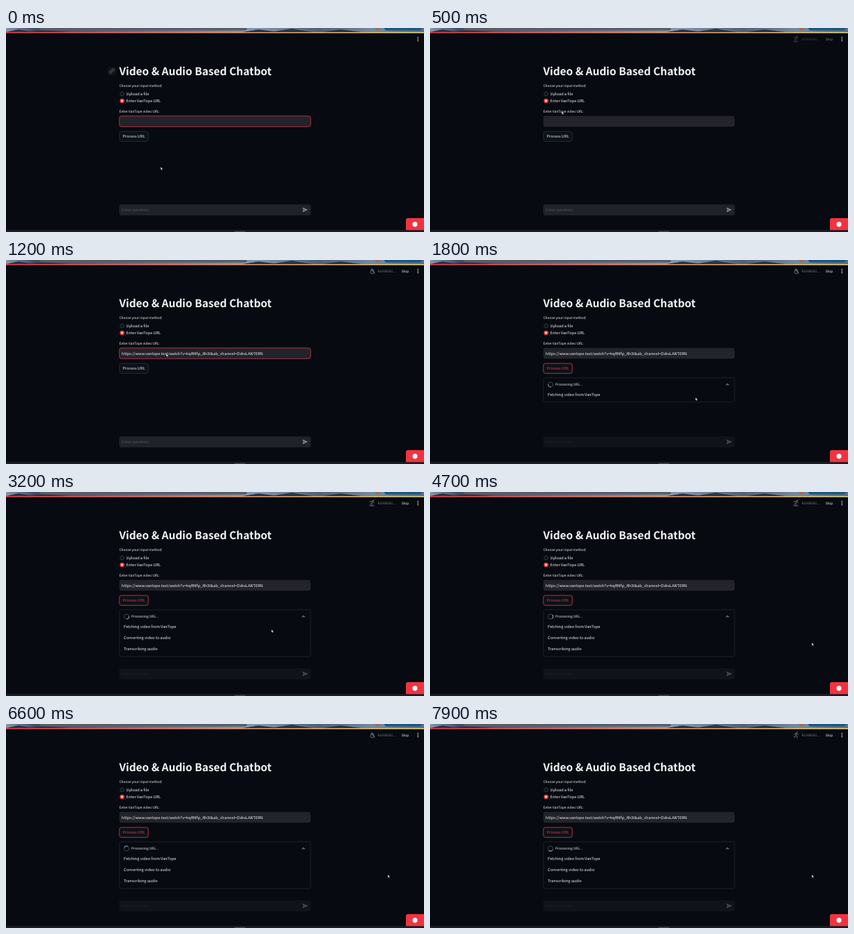
Recreate the animation shown at these times as an HTML page. Size 600 by 294 pixels, loop 8000 ms.

```html
<!DOCTYPE html>
<html lang="en">
<head>
<meta charset="utf-8">
<title>Chatbot</title>
<style>
  html, body { margin: 0; width: 100%; height: 100%; overflow: hidden; background: #070a10; }
  svg { display: block; width: 100vw; height: 100vh; }
  text {
    font: 5.6px "Noto Sans CJK JP", "Noto Sans CJK SC", "Noto Sans CJK KR", "Noto Sans CJK TC", "Open Sans", sans-serif;
    fill: #f4f5f7; text-rendering: geometricPrecision; white-space: pre;
  }
  .small { font-size: 4.9px; }
  .title { font-size: 15.4px; font-weight: 700; }
  .line { fill: none; stroke-linecap: round; stroke-linejoin: round; }
</style>
</head>
<body>
<svg viewBox="0 0 600 294">
  <defs>
    <linearGradient id="deco"><stop stop-color="#f5404a"/><stop offset="1" stop-color="#f3e07a"/></linearGradient>
    <linearGradient id="sky">
      <stop stop-color="#8595a8"/><stop offset=".07" stop-color="#3d4c62"/>
      <stop offset=".3" stop-color="#5d6f88"/><stop offset=".6" stop-color="#8199b6"/>
      <stop offset=".75" stop-color="#4e607b"/><stop offset=".88" stop-color="#7489a5"/>
      <stop offset="1" stop-color="#5a6f8c"/>
    </linearGradient>
  </defs>

  <!-- browser edge -->
  <rect width="600" height="6" fill="url(#sky)"/>
  <path d="M0 6 18 2 34 5 52 3 90 6zM340 6 362 2 385 5 410 1 440 6zM455 6 480 2 510 6z" fill="#28364a"/>
  <rect x="48" y="-6" width="298" height="9.5" rx="4" fill="#595d67"/>
  <circle cx="533" cy="0" r="3.5" fill="#a06a52"/>
  <rect x="543" y="-6" width="54" height="9.5" rx="4" fill="#1d5683"/>
  <rect y="6" width="600" height="1.4" fill="url(#deco)"/>
  <g fill="#e8e9eb"><circle cx="591.3" cy="13.6" r=".8"/><circle cx="591.3" cy="16" r=".8"/><circle cx="591.3" cy="18.4" r=".8"/></g>

  <g id="status">
    <g class="line" stroke="#777a82" stroke-width=".9">
      <g class="pose"><circle cx="525.6" cy="17.2" r="2.6"/><path d="M525 12.4v3.2h2.6l1.6 3.6M525 13.6l2.4.4"/></g>
      <g class="pose"><circle cx="526.6" cy="12.2" r=".5"/><path d="M526 13.6l-1 2.6 2 1.4-.4 2.4M525 16.4l-.8 2.2-2 .2M523 15l1-1.4 2 .1 1.4 1.4 1.4-.2"/></g>
      <g class="pose"><circle cx="527" cy="12.2" r=".6"/><path d="M526.6 13.8l-2.4 2 2 1.4-1.4 2.2M522.4 14l2-.4 2.2.2 2 1.6M524.2 16.8l-1.6 1.4M522 19.8h6.4"/></g>
    </g>
    <text class="small" x="533.5" y="17.7" style="fill:#73767e">RUNNING...</text>
    <text class="small" x="567.7" y="17.7">Stop</text>
  </g>

  <g id="link" class="line" stroke="#6c7078" stroke-width=".9">
    <rect x="145.5" y="56" width="13" height="12.5" rx="3" fill="#10141b" stroke="none"/>
    <g transform="rotate(-45 152 62)"><path d="M151.2 60.4h-1.4a1.6 1.6 0 0 0 0 3.2h1.4M152.8 60.4h1.4a1.6 1.6 0 0 1 0 3.2h-1.4M150.6 62h2.8"/></g>
  </g>
  <text class="title" x="162.5" y="67.8">Video &amp; Audio Based Chatbot</text>

  <text class="small" x="162.5" y="85.1">Choose your input method:</text>
  <circle cx="166.6" cy="95" r="2.9" fill="#10131b" stroke="#3b3f49" stroke-width=".8"/>
  <circle cx="166.6" cy="104.9" r="3.2" fill="#f5404a"/><circle cx="166.6" cy="104.9" r="1.2" fill="#fff"/>
  <text x="172.6" y="97.2">Upload a file</text>
  <text x="172.6" y="107.1">Enter VanTope URL</text>

  <text class="small" x="162.5" y="122.2">Enter VanTope video URL:</text>
  <rect id="field" x="162.7" y="126.8" width="274.6" height="15.4" rx="3" fill="#22232b" stroke-width=".8"/>
  <text id="url" x="166" y="136.8">https://www.vantope.test/watch?v=kqRMfp_8h3t&amp;ab_channel=OdreLANTERN</text>

  <rect id="button" x="162.8" y="149" width="41.4" height="14.4" rx="3" fill="#0d1118" stroke-width=".8"/>
  <text id="label" x="183.5" y="158.3" text-anchor="middle">Process URL</text>

  <g id="panel">
    <rect id="frame" x="162.8" y="169.8" width="274.4" rx="3" fill="none" stroke="#23272f" stroke-width=".8"/>
    <circle cx="173" cy="179.5" r="3.6" class="line" stroke="#3f4552"/>
    <path id="spin" d="M173 175.9a3.6 3.6 0 0 1 3.6 3.6" class="line" stroke="#7f9fd0"/>
    <text class="small" x="180" y="181.3">Processing URL...</text>
    <path d="M425.5 180l1.5-1.5 1.5 1.5" class="line" stroke="#f4f5f7" stroke-width=".9"/>
    <text class="step" x="169" y="195.6">Fetching video from VanTope</text>
    <text class="step" x="169" y="211.8">Converting video to audio</text>
    <text class="step" x="169" y="228">Transcribing audio</text>
  </g>

  <rect id="chat" x="162.5" y="254.3" width="275" height="15.6" rx="3"/>
  <text id="ask" x="166" y="264.2">Enter question:</text>
  <path id="send" d="M426 258.8l7.6 3.2-7.6 3.2v-2.5l5-.7-5-.7z"/>

  <!-- corner badge and window edge -->
  <rect y="291" width="600" height="3" fill="#1b1d21"/>
  <rect x="328" y="292.8" width="15" height="1.2" fill="#4a4c50"/>
  <path d="M574 291.3V277a3 3 0 0 1 3-3h23v17.3z" fill="#f0333f"/>
  <circle cx="587" cy="282.8" r="3.6" fill="#fff"/>
  <g id="wait">
    <path d="M0 282.6h197.5a2 2 0 0 1 2 2v6.6H0z" fill="#5b7ca8"/>
    <text class="small" x="1.8" y="288.9" style="fill:#17202e">Waiting for www.nolvra.test...</text>
  </g>

  <g id="cursor" stroke="#000" stroke-width=".45" stroke-linejoin="round">
    <path id="arrow" d="M0 0v4.6l1.1-1 .8 1.7.8-.4-.8-1.6h1.5z" fill="#fff"/>
    <path id="hand" d="M-.5-2.4q.6-.6 1.1 0v2l2 .5q.6.2.5 1l-.4 2.4h-3.1l-2-2.6q.3-.8 1.1-.2l.8.6z" fill="#fff"/>
  </g>
</svg>
<script>
const $ = id => document.getElementById(id);
const all = name => [...document.getElementsByClassName(name)];
const poses = all("pose"), steps = all("step");
const LOOP = 8000, TICK = 100;
const CLICK = 1400;                      // button pressed
const STEP_AT = [1600, 2100, 2500];      // progress lines appear

// time, x, y
const path = [
  [0, 222, 200], [200, 222, 200], [600, 183, 105], [800, 183, 105],
  [1000, 230, 135], [1200, 230, 135], [1400, 185, 156],
  [1700, 381, 198], [3800, 381, 198], [4300, 548, 217]
];

const clamp = v => Math.max(0, Math.min(1, v));
const show = (el, v) => el.setAttribute("opacity", +v);

function paint(el, fill, stroke) {
  if (fill) el.style.fill = fill;
  if (stroke) el.style.stroke = stroke;
}

function pointer(t) {
  const i = path.findIndex(p => p[0] > t);
  if (i < 0) return path[path.length - 1].slice(1);
  const [t0, x0, y0] = path[i - 1], [t1, x1, y1] = path[i];
  const u = (t - t0) / (t1 - t0), e = u * u * (3 - 2 * u);
  return [x0 + (x1 - x0) * e, y0 + (y1 - y0) * e];
}

function draw(t) {
  const busy = t >= CLICK;

  show($("status"), t < 500 ? 0 : t < 1000 ? .5 : 1);
  poses.forEach((p, i) => show(p, t / TICK % 3 === i));
  show($("link"), t < 300);
  show($("wait"), t >= 600 && t < 1100);
  paint($("field"), "", t < 400 || (t >= 1000 && t < CLICK) ? "#d93842" : "none");
  show($("url"), t >= 1100);
  paint($("button"), "", busy ? "#e63b46" : "#2c3038");
  paint($("label"), busy ? "#e63b46" : "#f4f5f7");

  show($("panel"), t >= STEP_AT[0]);
  const count = STEP_AT.filter(s => t >= s).length;
  $("frame").setAttribute("height", 35 + 16.2 * Math.max(0, count - 1));
  steps.forEach((s, i) => show(s, clamp((t - STEP_AT[i] + TICK) / 300)));
  $("spin").setAttribute("transform", `rotate(${t * .7 % 360} 173 179.5)`);

  paint($("chat"), busy ? "#10131a" : "#20222a");
  paint($("ask"), busy ? "#23262d" : "#555861");
  paint($("send"), busy ? "#4d5058" : "#8b8e95");

  const [x, y] = pointer(t);
  const over = (t >= 600 && t <= 800) || t === CLICK;
  $("cursor").setAttribute("transform", `translate(${x} ${y})`);
  show($("arrow"), !over);
  show($("hand"), over);
}

const start = performance.now();
function loop() {
  const t = (performance.now() - start) % LOOP;
  draw(Math.floor(t / TICK) * TICK);
  requestAnimationFrame(loop);
}
loop();
</script>
</body>
</html>
```
